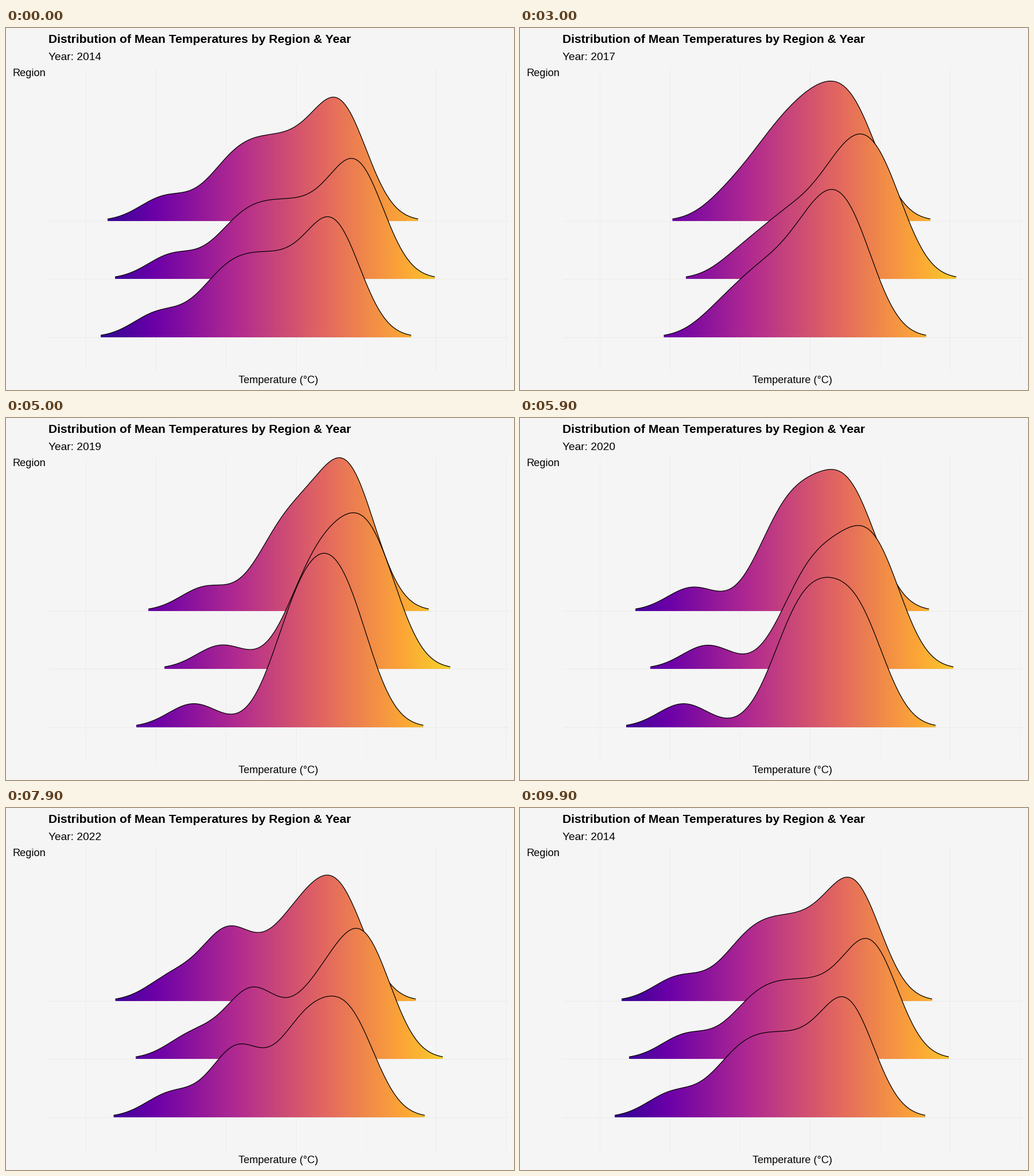
Animation of 885 by 632 pixels, one loop 10 s. Source, as a matplotlib script:

```python
import matplotlib.pyplot as plt
import numpy as np
from matplotlib.animation import FuncAnimation
from matplotlib.colors import LinearSegmentedColormap
from matplotlib.path import Path

W, H, DPI = 885, 632, 100
PX = 72 / DPI                    # points per pixel
X_MIN, X_MAX = 110.4, 838.6      # ends of the colour scale
BASES = (336.5, 437.5, 539.5)
BANDWIDTH, MONTH_HEIGHT = 44, 40.7
MONTH_GAP = 12                   # px between months of a cold or warm spell
YEARS = range(2014, 2024)
ARRIVALS = [0, 10, 20, 30, 40, 50, 59, 69, 79, 89, 99]
TWEEN = 5

# Months that are cold, mild and warm, then for each region:
# cold centre, first and last mild month, warm centre (px).
SEASONS = {
    2014: ((1, 6, 5), (277, 374, 522, 583), (290, 386, 546, 612), (265, 356, 504, 571)),
    2016: ((3, 6, 3), (442, 500, 588, 630), (483, 559, 629, 675), (425, 506, 591, 625)),
    2018: ((1, 6, 5), (302, 404, 498, 543), (308, 420, 560, 588), (289, 391, 501, 533)),
    2019: ((1, 7, 4), (348, 455, 589, 607), (376, 508, 614, 645), (327, 483, 567, 598)),
    2021: ((1, 7, 4), (254, 406, 500, 560), (278, 436, 568, 607), (243, 430, 535, 592)),
    2023: ((4, 4, 4), (345, 492, 588, 610), (392, 538, 634, 657), (350, 505, 555, 609)),
}

xs = np.arange(111, 838.5, 0.5)


def spell(count, centre):
    return centre + MONTH_GAP * (np.arange(count) - (count - 1) / 2)


def months(counts, cold, first, last, warm):
    """Positions of the twelve monthly means, sorted."""
    n_cold, n_mild, n_warm = counts
    return np.sort(np.r_[spell(n_cold, cold), np.linspace(first, last, n_mild),
                         spell(n_warm, warm)])


def density(centres):
    bells = np.exp(-((xs[:, None] - centres) / BANDWIDTH) ** 2 / 2)
    return MONTH_HEIGHT * bells.sum(axis=1)


temps = {year: [months(counts, *keys) for keys in regions]
         for year, (counts, *regions) in SEASONS.items()}
for year in YEARS:
    if year not in SEASONS:      # halfway between its neighbours
        temps[year] = np.mean([temps[year - 1], temps[year + 1]], axis=0)

curves = np.array([[density(region) for region in temps[year]] for year in YEARS])
cutoff = 0.01 * curves.max()

plt.rcParams["font.family"] = "Liberation Sans"
fig = plt.figure(figsize=(W / DPI, H / DPI), dpi=DPI, facecolor="#f5f5f5")
ax = fig.add_axes([0, 0, 1, 1])
ax.axis("off")

major = dict(color="#eaeaea", linewidth=PX, zorder=0)
minor = dict(color="#eeeeee", linewidth=PX, zorder=0)
ax.vlines(np.arange(138.5, W, 244), 69, 600, **minor)
ax.vlines(np.arange(260.5, W, 244), 69, 600, **major)
ax.hlines(BASES, 74, 875, **major)


def label(x, y, text, size, **style):
    return ax.text(x, y, text, fontsize=size * PX, va="baseline", **style)


label(73.5, 26, "Distribution of Mean Temperatures by Region & Year", 21.2,
      weight="bold")
subtitle = label(74, 55.5, "", 19.1)
label(11.7, 83.5, "Region", 18.3)
label(474, 619.5, "Temperature (°C)", 18.1, ha="center")

heat = LinearSegmentedColormap.from_list(
    "heat", ["#0d0887", "#6a00a8", "#b12a90", "#e16462", "#fca636", "#f0f921"], N=512)
ramp = np.linspace(0, 1, 728)[None, :]
fills, outlines = [], []
for z, base in enumerate(BASES, 1):
    fills.append(ax.imshow(ramp, cmap=heat, aspect="auto", zorder=z,
                           interpolation="nearest",
                           extent=(X_MIN, X_MAX, base + 0.5, 0)))
    outlines += ax.plot([], [], color="black", lw=1.25 * PX, zorder=z + 0.5,
                        solid_capstyle="butt")
ax.set_xlim(0, W)
ax.set_ylim(H, 0)


def update(frame):
    leg = int(np.searchsorted(ARRIVALS, frame))
    new, old = leg % len(YEARS), (leg - 1) % len(YEARS)
    p = max(0, (frame - ARRIVALS[leg] + TWEEN) / TWEEN)
    subtitle.set_text(f"Year: {YEARS[new if p >= 0.5 else old]}")
    heights = curves[old] + p * (curves[new] - curves[old])
    for height, base, fill, outline in zip(heights, BASES, fills, outlines):
        shown = np.flatnonzero(height >= cutoff)
        part = slice(shown[0], shown[-1] + 1)
        x, y = xs[part], base - height[part]
        outline.set_data(x, y)
        floor = base + 0.5
        points = np.column_stack([np.r_[x[0], x, x[-1]], np.r_[floor, y, floor]])
        fill.set_clip_path(Path(points), ax.transData)
    return [subtitle, *fills, *outlines]


anim = FuncAnimation(fig, update, frames=100, interval=100, repeat=True,
                     repeat_delay=0, blit=False)
plt.show()
```
